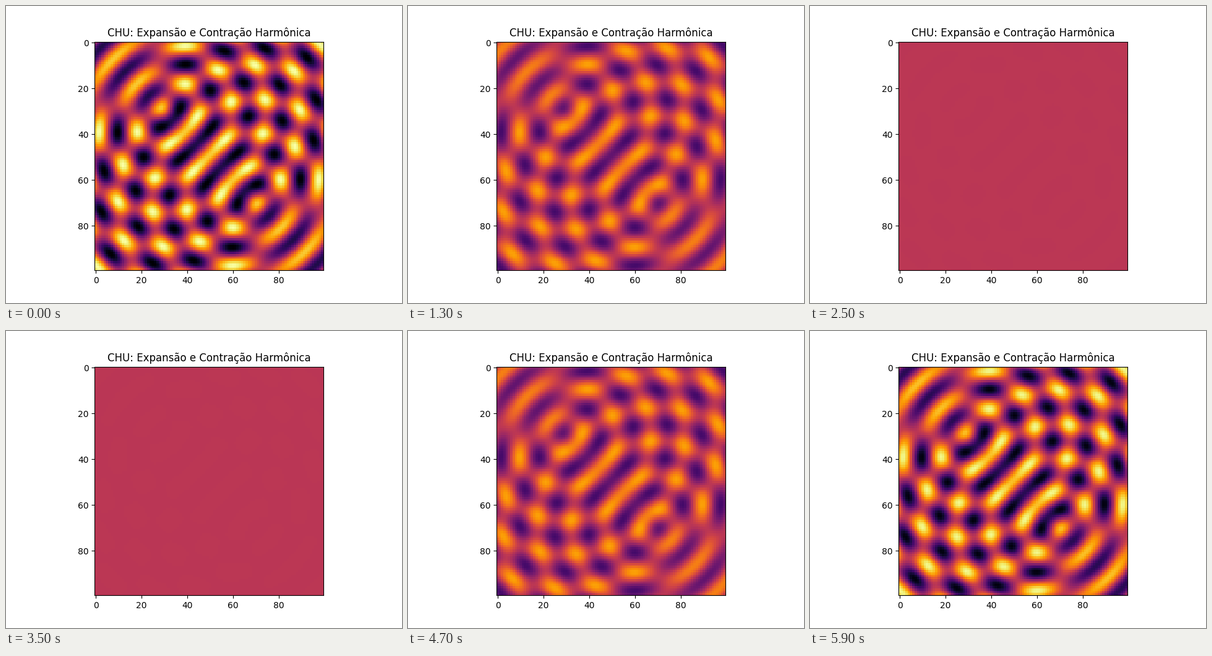
Write a matplotlib script that moves like this. It is 640 px wide and 480 px high and loops after 6 s.

```python
import numpy as np
import matplotlib.pyplot as plt
from matplotlib.animation import FuncAnimation

FRAMES = 60
INTERVAL = 100      # ms
PERIOD = 20         # frames per oscillation
WAVELENGTH = 1.5
SOURCES = [(-2, -2), (2, 2)]

axis = np.linspace(-5, 5, 100)
X, Y = np.meshgrid(axis, axis)


def ripple(cx, cy):
    """Circular wave around one source."""
    return np.cos(2 * np.pi * np.hypot(X - cx, Y - cy) / WAVELENGTH)


pattern = sum(ripple(cx, cy) for cx, cy in SOURCES)


def field(frame):
    """Standing interference pattern at the given frame."""
    return pattern * np.cos(2 * np.pi * frame / PERIOD)


fig, ax = plt.subplots(figsize=(6.4, 4.8), dpi=100)
image = ax.imshow(field(0), cmap="inferno", vmin=-2, vmax=2)
ax.set_title("CHU: Expansão e Contração Harmônica")


def update(frame):
    image.set_data(field(frame))
    return [image]


anim = FuncAnimation(fig, update, frames=FRAMES, interval=INTERVAL,
                     repeat=True, repeat_delay=0)
plt.show()
```
